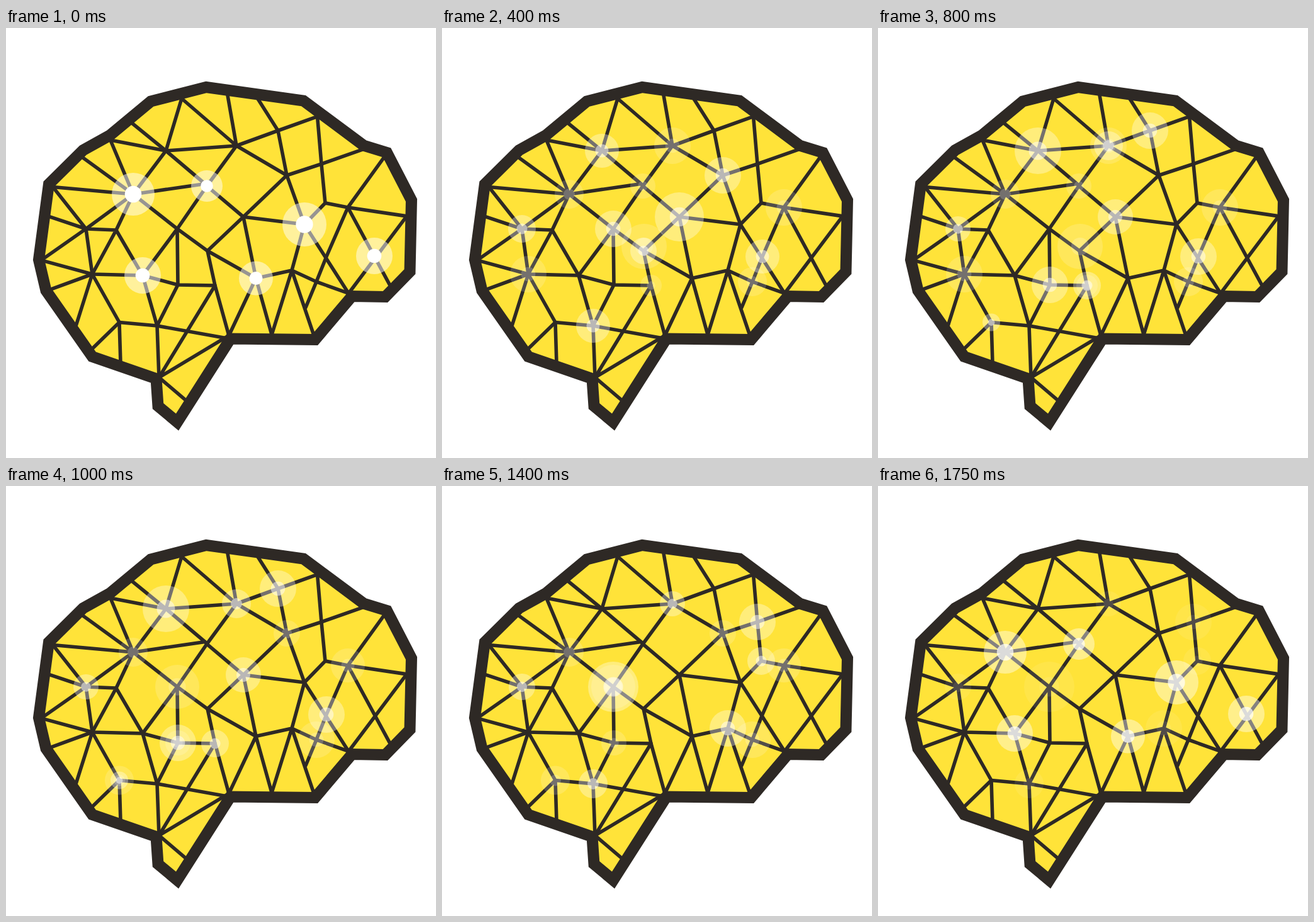
An HTML page for the animation above (1.8 s loop, 683 px wide and 683 px high).

```html
<!DOCTYPE html>
<html lang="en">
<head>
<meta charset="utf-8">
<title>Brain network</title>
<style>
  html, body { margin: 0; width: 100%; height: 100%; overflow: hidden; background: #fff; }
  svg { display: block; width: 100%; height: 100%; }
  .fill { fill: #ffe339; }
  .line { fill: none; stroke: #2e2925; stroke-width: 5.6; stroke-linecap: round; stroke-linejoin: round; }
  .rim { fill: none; stroke: #2e2925; stroke-width: 18; }
  .halo { fill: #fff; fill-opacity: .5; }
  .dot { fill: #fff; }
  /* Each group peaks for one moment and fades in six 50 ms steps on either side. */
  .glow { animation: pulse 1800ms steps(6, end) infinite; }
  @keyframes pulse {
    0% { opacity: 1; }
    16.666%, 83.333% { opacity: 0; }
    100% { opacity: 1; }
  }
</style>
</head>
<body>
<svg id="stage" viewBox="0 0 683 683" xmlns="http://www.w3.org/2000/svg"></svg>
<script>
  const parse = text => text.split(" ").map(pair => pair.split(",").map(Number));

  // Corners of the outline, clockwise
  const corners = parse("318,94 472.5,115.5 568,186.5 605,198 644,273.5 641.5,387 602.5,427 549.5,426 " +
    "491,495 356.5,493.5 272,626 241.5,600.5 238.5,557 137,522 63.5,417 52,368 68,248 122.5,194 165,170.5 230,116.5");

  // Junctions, one letter each, in the order of the names
  const names = "ABCDEFGHIJKLMNOPQRSTUVWXYZabcdep";
  const places = parse("202,264 254,195 319,251 366,187 432,163 446,234 377,300 474,312 507,278 543,285 " +
    "501,216 509,363 493,403 454,385 397,397.5 320,354 272,319 217,393 273,408 332,409 240,473 " +
    "180,467.5 137,391 127,319 175,321 585,362 279,112 476,444 354,488.5 243,555 316,247.5 321,347");

  // Chains of junctions; a number is a place on the rim: corner index plus fraction to the next
  const chains = [
    "18.465 B D", "17.94 B e C G F H I J 4.225", "17.94 A 16.885", "15.97 A B a D 0.225",
    "0.537 E F D E 1.275 K I", "F K 2", "A e", "D C Q R S T d c", "A Q P O N H G O",
    "Q S U d 9.768", "G P T c O 8.513 N 7.95", "N M 7", "J L M b", "H 7 4.225", "2.96 J 5.676",
    "R U", "V U 9.02", "W V 13.08", "V 12.58", "Y R W Y A X Y", "W 13.43", "14 W 14.93",
    "15.02 X W", "15.58 X 15.97"
  ];

  // Lit junctions per group, each with its halo radius
  const groups = [
    "A34 C25 H35 Z29 O27 R29",
    "B27 F29 G39 X22 Q29 P21 L27 U27",
    "D29 C20 A23 J29 p36 W29 T17 M23",
    "B37 E29 D23 G28 X20 S29 T22 V14 L29",
    "A23 F21 J27 M29 Q35 S20 V23",
    "D20 K29 I22 X21 Q40 N29 U23"
  ];

  const INSET = 7, DOT = 0.39, STEP = 300, LOOP = STEP * groups.length;

  // Point just inside the rim's inner edge
  function onRim(t) {
    const i = Math.floor(t), f = t - i;
    const [x, y] = corners[i], [nx, ny] = corners[(i + 1) % corners.length];
    const dx = nx - x, dy = ny - y, k = INSET / Math.hypot(dx, dy);
    return [x + dx * f - dy * k, y + dy * f + dx * k];
  }

  const junction = name => places[names.indexOf(name)];
  const locate = token => isNaN(token) ? junction(token) : onRim(+token);
  const line = chain => `<polyline class="line" points="${chain.split(" ").map(locate).join(" ")}"/>`;
  const outline = kind => `<polygon class="${kind}" points="${corners.join(" ")}"/>`;
  const circle = (kind, [x, y], r) => `<circle class="${kind}" cx="${x}" cy="${y}" r="${r}"/>`;

  function light(token) {
    const at = junction(token[0]), r = +token.slice(1);
    return circle("halo", at, r) + circle("dot", at, r * DOT);
  }

  const glow = (group, i) =>
    `<g class="glow" style="animation-delay:${i * STEP - LOOP}ms">${group.split(" ").map(light).join("")}</g>`;

  document.getElementById("stage").innerHTML =
    outline("fill") + chains.map(line).join("") + outline("rim") + groups.map(glow).join("");
</script>
</body>
</html>
```
